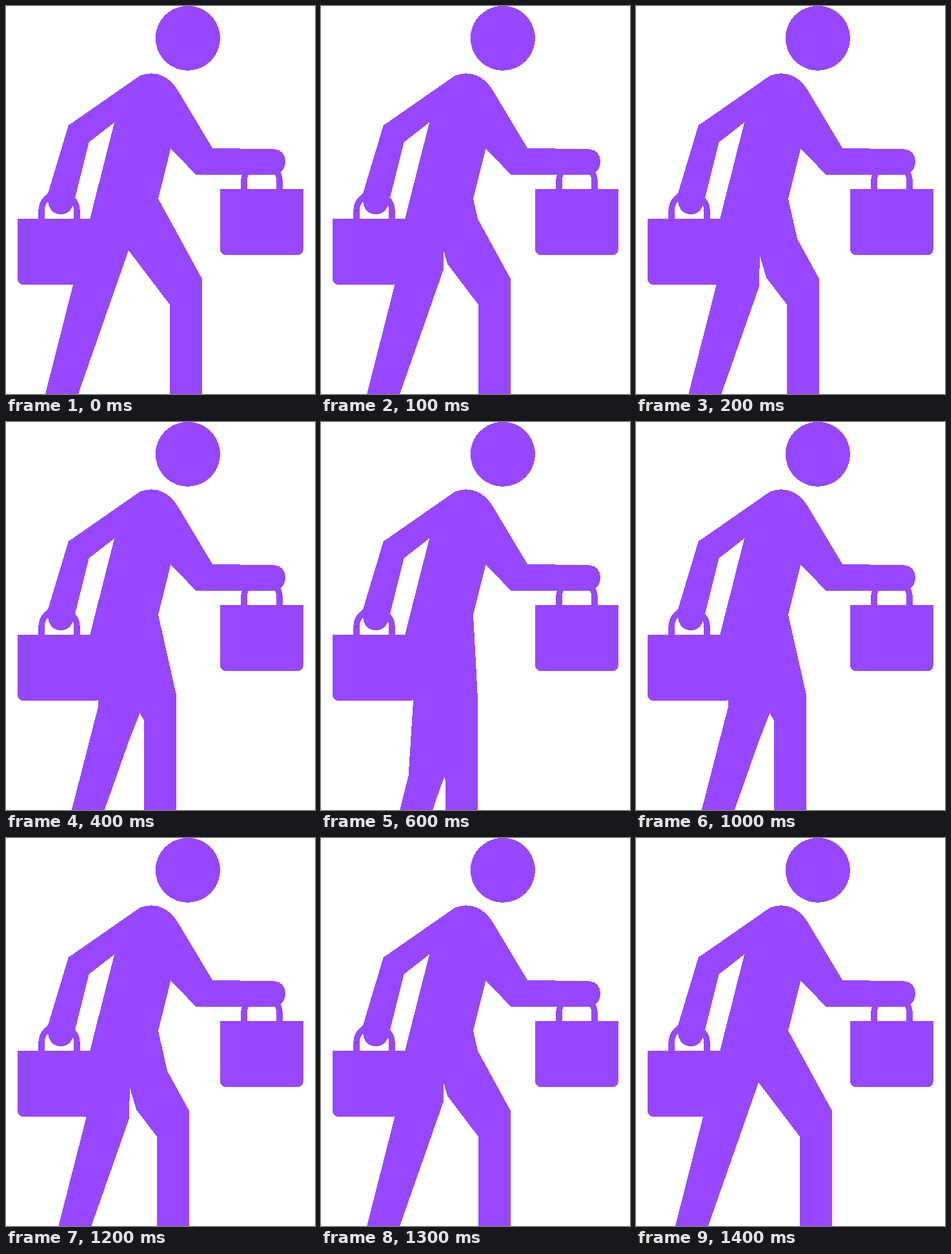
An HTML page that plays this animation: 479x600 px, repeating every 1500 ms.

```html
<!DOCTYPE html>
<html lang="en">
<head>
<meta charset="utf-8">
<title>Walking shopper</title>
<style>
  html, body { margin: 0; width: 100%; height: 100%; overflow: hidden; background: #fff; }
  svg { display: block; width: 100vw; height: 100vh; fill: #9747ff; shape-rendering: crispEdges; }
  .handle { fill: none; stroke: #9747ff; stroke-width: 9.5; }
</style>
</head>
<body>
<svg viewBox="0 0 479 600">
  <defs>
    <g id="bag">
      <path d="M18 329H147V422a9 9 0 0 1-9 9H27a9 9 0 0 1-9-9z"/>
      <path class="handle" d="M55 330V317a27.5 27.5 0 0 1 55 0V330"/>
    </g>
  </defs>
  <circle cx="281.8" cy="49.7" r="50"/>
  <path d="M208 107.5C228 100 251 105 266 130L320 219.7L416 221.5C427 222 433 230 433 240C433 248 430 254 425 257
           L416 261H294.5L255.5 220.5L236 298V329H130.2L168 180L128.7 210.5L107 297L104 307
           A19.5 19.5 0 0 1 65.5 304L65 290L96.7 184.7z"/>
  <path id="legs"/>
  <use href="#bag"/>
  <use href="#bag" x="314" y="-46"/>
</svg>
<script>
const STEP = 100, COUNT = 15, PASSING = 4, CLOSED = 7;

const mix = (a, b, t) => a.map((v, i) => v + (b[i] - v) * t);

// The legs slide together: full stride, then thighs passing, then feet closed.
function legPath(step) {
  const move = (stride, passing, closed, power = 1) => step <= PASSING
    ? mix(stride, passing, (step / PASSING) ** power)
    : mix(passing, closed, (step - PASSING) / (CLOSED - PASSING));

  const crotch = [190, 378];
  const knee = move([304, 422], [264, 422], [232, 422]);
  const rearShift = 10.2 * step;
  const points = [
    [236, 298],
    move([236, 298], [264, 422], [232, 422]),
    knee,
    [knee[0], 600],
    [knee[0] - 50, 600],
    move([254, 462], [214, 462], [182, 599]),
    move(crotch, [214, 462], [182, 599]),
    move(crotch, [207.5, 450], [183, 599], 3),
    move(crotch, [191, 492], [183, 599]),
    [112 + rearShift, 600],
    [61 + rearShift, 600],
    move([104, 431], [143, 440], [132, 600]),
    [Math.min(104 + rearShift, 143), 431],
    [130.2, 329],
    [138, 298]
  ];
  return 'M' + points.join('L') + 'z';
}

const legs = document.getElementById('legs');
const start = performance.now();
let shown = -1;

function draw() {
  const tick = Math.floor((performance.now() - start) / STEP) % COUNT;
  const step = Math.min(tick, COUNT - 1 - tick);
  if (step !== shown) legs.setAttribute('d', legPath(shown = step));
  requestAnimationFrame(draw);
}
draw();
</script>
</body>
</html>
```
